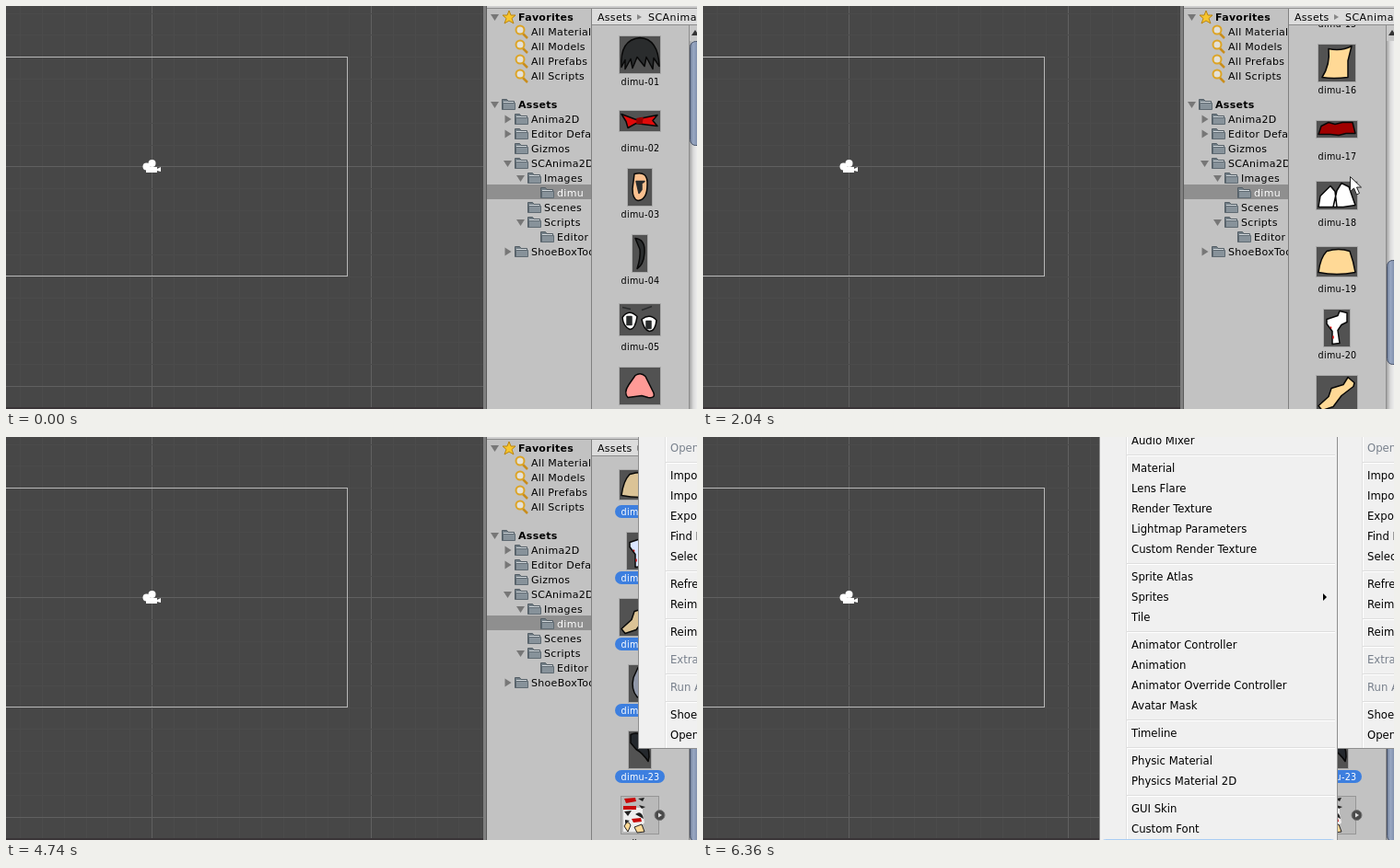
An HTML page with a canvas that plays this animation: 750x438 px, repeating every 8000 ms.

```html
<!DOCTYPE html>
<html lang="en">
<head>
<meta charset="utf-8">
<style>
html, body { margin: 0; width: 100%; height: 100%; overflow: hidden; background: #474747; }
canvas { display: block; }
</style>
</head>
<body>
<canvas id="stage" width="750" height="438"></canvas>
<script>
const ctx = document.getElementById('stage').getContext('2d');
const LOOP = 8000, TICK = 30, ROW = 72;
const SKIN = '#ffd996', WHITE = '#fff', INK = '#2a2c2d', GREY = '#a9a9a9', RED = '#e00a0a';
const FONT = '"DejaVu Sans", sans-serif';

// Each sprite: thumbnail width, height, then colour and path pairs around its centre.
const leg = 'M12-18L19-12 18-8 5 2-4 14-16 18-20 13-9 3-6-6 7-10Z';
const sleeve = 'M-4-16L8-17 10-7 13 3 14 12 2 18-9 15-14 4-8-6Z';
const thigh = 'M-9-15Q5-12 16-18L12-2 12 16Q-4 18-16 16Q-7 2-9-15Z';
const lens = 'M-2-17Q5-16 8-4L8 12Q3 18-3 15Q-10 7-7-6Z';
const sprites = [
  [44, 40, INK, 'M-20 14Q-22-16 0-18Q20-17 21 13L15 4 14 16 7 3 5 13-3 3-8 15-10 5-16 16-16 6Z'],
  [44, 22, RED, 'M-20-7L-4-1 4-3 19-6 14 0 19 6 3 4-4 3-13 8-15 1Z', '#900', 'M-3-2L3-3 2 3-3 3Z'],
  [26, 40, '#fbc08f', 'M-6-14Q9-18 8-2Q8 14-2 15Q-8 14-8 2Z', INK, 'M-4-6L5-6 4-5 2-4 2 3-1 7Z'],
  [16, 40, INK, 'M-5-16Q6-15 5 0Q4 13-3 17Q1 5 0-4Z'],
  [44, 34, WHITE, 'M-19-2Q-12-12-3-3Q-5 11-11 11Q-18 8-19-2ZM2 0Q11-7 18 1Q17 13 10 13Q4 11 2 0Z',
    INK, 'M-14-3H-9V6H-14ZM7 2H12V10H7ZM-19-13L-10-11M2-10L13-14'],
  [44, 40, '#ff9a96', 'M-13 13Q-18 8-12-1L-5-11Q1-15 6-10L15 8Q17 14 9 13L2 11Z'],
  [44, 40, SKIN, 'M-19-2Q-18-14-9-16Q6-19 16-11Q22-3 19 6Q12 18-2 17Q-16 17-18 8Q-15 4-19-2Z'],
  [32, 40, WHITE, sleeve, RED, 'M-10 2L-8 3M-10 8L-8 9M-4 13L-2 14'],
  [44, 34, SKIN, 'M5-15L16-15Q21 2 13 8L0 10-9 9-14 14-19 12-15 5-19 0-6 0 5-3Z'],
  [32, 40, GREY, 'M-9-14Q1-19 9-13L13 2 11 12Q5 19-5 15L-13 5Z'],
  [44, 10, '#222', 'M-20 2L-8 0 4 1 20-2 6 2-6 1Z'],
  [32, 40, WHITE, sleeve],
  [44, 40, SKIN, leg],
  [44, 20, '#a30000', 'M-18-5H18L20 6H-20Z'],
  [24, 40, GREY, lens],
  [40, 40, SKIN, thigh],
  [44, 18, '#a00000', 'M-17-3L-9-7-2-5 6-7 17-7 20 5 10 5 2 7-7 6-20 6Z'],
  [44, 30, WHITE, 'M-20 13L-18 1-7-10-2-4 0 13ZM-4 13L0-5 5-13 13-9 20 11 7 13Z'],
  [44, 32, SKIN, 'M-20 12Q-18-4-11-11Q2-15 14-11Q18 0 20 12Q0 16-20 12Z'],
  [28, 40, WHITE, 'M-11-9L1-13 3-18 11-16 11-6 5-3 1 3 3 17-5 18-5 4-11-4Z', RED, 'M-7-1L-6 1M-4 9L-4 12'],
  [44, 40, SKIN, leg],
  [24, 40, GREY, lens],
  [24, 40, INK, 'M-10-16Q-2-20 3-13Q10-4 10 8L9 13Q3 4-4 0L-10-7Z'],
];

const tree = [ // label, y, indent, arrow, icon
  ['Favorites', 12, 0, 'open', 'star'], ['All Materials', 28, 1, '', 'find'], ['All Models', 44, 1, '', 'find'],
  ['All Prefabs', 60, 1, '', 'find'], ['All Scripts', 76, 1, '', 'find'],
  ['Assets', 107, 0, 'open'], ['Anima2D', 123, 1, 'shut'], ['Editor Default', 139, 1, 'shut'], ['Gizmos', 155, 1],
  ['SCAnima2D', 171, 1, 'open'], ['Images', 187, 2, 'open'], ['dimu', 203, 3], ['Scenes', 219, 2],
  ['Scripts', 235, 2, 'open'], ['Editor', 251, 3], ['ShoeBoxTool', 267, 1, 'shut'],
];

const mainMenu = { x: 686, w: 90, top: -30, bottom: 338, first: 12, groups: [
  ['-Open'], ['Import', 'Import', 'Export', 'Find R', 'Select'], ['Refresh', 'Reimport'], ['Reimport'],
  ['-Extract'], ['-Run API'], ['ShoeBox', 'Open C']] };
const subMenu = { x: 430, w: 258, top: -30, bottom: 470, first: 4, groups: [
  ['Audio Mixer'], ['Material', 'Lens Flare', 'Render Texture', 'Lightmap Parameters', 'Custom Render Texture'],
  ['Sprite Atlas', 'Sprites>', 'Tile'],
  ['Animator Controller', 'Animation', 'Animator Override Controller', 'Avatar Mask'],
  ['Timeline'], ['Physic Material', 'Physics Material 2D'], ['GUI Skin', 'Custom Font', 'Shader']] };

const cursorKeys = [[330, 753, 98], [870, 689, 52], [1260, 689, 52], [1470, 686, 186], [1590, 685, 187],
  [2040, 702, 185], [2130, 727, 208], [2280, 727, 208], [2790, 694, 338], [3300, 694, 338], [3600, 707, 320],
  [3720, 707, 320], [3900, 688, 338], [4290, 688, 338], [4740, 712, -26], [5790, 600, -26], [6360, 545, 440]];
const scrollKeys = [[1440, 0], [1590, 360], [2040, 1071], [2130, 1297]];

const smooth = k => k * k * (3 - 2 * k);
function at(keys, t, ease = k => k) {
  const next = keys.findIndex(key => key[0] > t);
  if (next === 0) return keys[0].slice(1);
  if (next < 0) return keys[keys.length - 1].slice(1);
  const a = keys[next - 1], b = keys[next], k = ease((t - a[0]) / (b[0] - a[0]));
  return a.slice(1).map((v, i) => v + (b[i + 1] - v) * k);
}

function rect(x, y, w, h, color) {
  ctx.fillStyle = color;
  ctx.fillRect(x, y, w, h);
}
function text(str, x, y, size = 11, color = '#000', { bold = false, align = 'left', gap = 0 } = {}) {
  ctx.font = `${bold ? 'bold ' : ''}${size}px ${FONT}`;
  ctx.letterSpacing = gap + 'px';
  ctx.textAlign = align;
  ctx.fillStyle = color;
  ctx.fillText(str, x, y + 4);
}
function shape(d, x, y, fill, stroke, width = 1) {
  const path = new Path2D(d);
  ctx.save();
  ctx.translate(x, y);
  if (fill) { ctx.fillStyle = fill; ctx.fill(path); }
  if (stroke) { ctx.strokeStyle = stroke; ctx.lineWidth = width; ctx.lineJoin = 'round'; ctx.stroke(path); }
  ctx.restore();
}
function circle(x, y, r, fill, stroke, width = 1) {
  ctx.beginPath();
  ctx.arc(x, y, r, 0, 7);
  if (fill) { ctx.fillStyle = fill; ctx.fill(); }
  if (stroke) { ctx.strokeStyle = stroke; ctx.lineWidth = width; ctx.stroke(); }
}
function pill(x, y, w, h, r, fill, stroke) {
  ctx.beginPath();
  ctx.roundRect(x, y, w, h, r);
  ctx.fillStyle = fill;
  ctx.fill();
  if (stroke) { ctx.strokeStyle = stroke; ctx.lineWidth = 1; ctx.stroke(); }
}
function clipped(x, y, w, h, draw) {
  ctx.save();
  ctx.beginPath();
  ctx.rect(x, y, w, h);
  ctx.clip();
  draw();
  ctx.restore();
}

function drawScene() {
  rect(0, 0, 518, 438, '#474747');
  const step = 23.82;
  for (let i = -6; i <= 15; i++) rect(Math.round(158 + i * step), 0, 1, 438, i % 10 ? '#4b4b4b' : '#606060');
  for (let i = -7; i <= 11; i++) rect(0, Math.round(174.4 + i * step), 518, 1, i % 10 ? '#4b4b4b' : '#606060');
  ctx.strokeStyle = '#b8b8b8';
  ctx.lineWidth = 1;
  ctx.strokeRect(-5.5, 55.5, 376, 238);
  circle(152.5, 174.5, 4, WHITE);
  circle(158.5, 171, 4, WHITE);
  shape('M-6 1H6V3L10 1V6L6 5V7H-6Z', 158, 174, WHITE);
  rect(0, 436, 518, 2, '#393437');
  rect(518, 0, 3, 438, '#7f7f7f');
  rect(521, 0, 1, 438, '#5c5c5c');
}

function drawIcon(kind, x, y) {
  if (kind === 'star') {
    shape('M0-7L2-2 7-2 3 1.500 5 7 0 4-5 7-3 1.500-7-2-2-2Z', x + 8, y, '#f8c62c', '#b98512');
  } else if (kind === 'find') {
    shape('M3 3L8 8', x + 6, y - 1, null, '#c98d1c', 2.5);
    circle(x + 6, y - 2, 4.5, '#e4e1d8', '#dca426', 2);
  } else {
    shape('M.5-5.500H5.500L7-3.500H13.500V5.500H.5Z', x, y, '#737f87', '#525d65');
    shape('M1.500-1.500H14.500V5.500H1.500Z', x, y, '#87929a', '#5f6a72');
    rect(x + 2, y - 3, 11, 1, '#d3d9dd');
  }
}

function drawTree() {
  rect(522, 0, 228, 438, '#c2c2c2');
  clipped(522, 0, 113, 438, () => {
    rect(522, 194, 113, 16, '#8f8f8f');
    for (const [label, y, indent, arrow, icon] of tree) {
      const x = 538 + indent * 14;
      if (arrow) shape(arrow === 'open' ? 'M-4.500-3H4.500L0 4Z' : 'M-3-4.500L4 0-3 4.500Z', x - 7.5, y, '#777');
      drawIcon(icon, x, y);
      text(label, x + 18, y, 11, label === 'dimu' ? WHITE : '#000', { bold: !indent, gap: .3 });
    }
  });
  rect(635, 0, 1, 438, '#808080');
}

function drawThumb(i, x, y, selected) {
  const [w, h, ...parts] = sprites[i];
  const mid = y + .5;
  rect(x - w / 2 - 1, y - h / 2, w + 2, h + 2, '#aaa');
  rect(x - w / 2, y - h / 2 + 1, w, h, '#525252');
  for (let p = 0; p < parts.length; p += 2) {
    shape(parts[p + 1], x, mid, parts[p], p ? parts[p] : '#080808', 1.5);
  }
  if (selected) {
    ctx.globalCompositeOperation = 'multiply';
    shape(parts[1], x, mid, '#dbe6ff');
    ctx.globalCompositeOperation = 'source-over';
    pill(x - 27, y + 23, 54, 14, 7, '#3d7fdf');
  }
  const name = 'dimu-' + String(i + 1).padStart(2, '0');
  text(name, x + .5, y + 30, 9.6, selected ? WHITE : '#000', { align: 'center', gap: .3 });
}

function drawSheet(x, y) {
  rect(x - 21, y - 21, 42, 42, '#969696');
  rect(x - 20, y - 20, 40, 40, '#b9b9b9');
  shape('M-18-8H3V-2L5 8-4 18H-18Z', x, y, '#eee');
  shape('M-17-18L-5-19-4-15-15-13ZM-18-10H-4V-6H-18ZM-9 4L1 3 2 7-7 8Z', x, y, '#c80909');
  shape('M-17 12Q-13 4-10 11L-13 18ZM-6 13L2 10 5 18-3 19Z', x, y, SKIN, '#222');
  shape('M-2-18L5-19 3-15ZM-17-4L-9-5-13 1ZM-5-1Q2-6 4 4ZM-1-11L6-9 2-7ZM-16 5L-11 6-16 9Z', x, y, '#222');
  circle(x + 21.5, y, 5.5, '#4a4a4a', '#777');
  shape('M-1.500-2.500L2.500 0-1.500 2.500Z', x + 21.5, y, '#ddd');
}

function drawAssets(t, scroll) {
  const isSelected = i => t >= 3000 ? i < 23 : t >= 1020 && i === 0;
  clipped(636, 21, 106, 417, () => {
    for (let i = 0; i <= sprites.length; i++) {
      const y = 52 + i * ROW - Math.round(scroll);
      if (y < -40 || y > 470) continue;
      if (i < sprites.length) drawThumb(i, 688, y, isSelected(i));
      else {
        drawSheet(688, y);
        text('dimu', 688, y + 30, 9.6, '#000', { align: 'center' });
      }
    }
  });
  rect(522, 0, 228, 2, '#cecece');
  rect(522, 2, 228, 1, '#8e8e8e');
  rect(636, 3, 114, 17, '#dcdcdc');
  rect(636, 20, 114, 1, '#8c8c8c');
  text('Assets', 642, 12, 11, '#000', { gap: .3 });
  shape('M-2-3L3 0-2 3Z', 687, 12, '#888');
  text('SCAnima2D', 697, 12, 11, '#000', { gap: .45 });

  const track = ctx.createLinearGradient(742, 0, 750, 0);
  track.addColorStop(0, '#a4a4a4');
  track.addColorStop(.5, '#dadada');
  track.addColorStop(1, '#ececec');
  rect(741, 21, 1, 417, '#8d8d8d');
  rect(742, 38, 8, 400, track);
  rect(742, 21, 8, 17, '#c8c8c8');
  shape('M-4 3H4L0-3Z', 748, 29, '#333');
  const bar = ctx.createLinearGradient(742, 0, 750, 0);
  bar.addColorStop(0, '#68768f');
  bar.addColorStop(.5, '#9aa9c4');
  bar.addColorStop(1, '#8190ac');
  pill(742.5, 38.5 + scroll * .2222, 15, 113, 6, bar, '#465065');
}

function drawMenu({ x, w, top, bottom, first, groups }, px, py) {
  rect(x, top, w + 1, bottom - top + 1, '#8f8f8f');
  rect(x + 1, top, w - 1, bottom - top, '#f0f0f0');
  rect(x + 29, top, 1, bottom - top, '#e0e0e0');
  rect(x + 30, top, 1, bottom - top, '#fff');
  let y = first;
  for (const group of groups) {
    for (const item of group) {
      const hover = px > x && px < x + w && py >= y - 11 && py < y + 11;
      if (hover) pill(x + 3.5, y - 10.5, w - 6, 21, 3, '#dce9f7', '#a9cdf3');
      text(item.replace(/[->]/g, ''), x + 35, y, 11.65, item[0] === '-' ? '#78808c' : '#000');
      if (item.endsWith('>')) shape('M-2-4L2 0-2 4Z', x + 245, y, '#000');
      y += 22;
    }
    if (y < bottom) {
      rect(x + 30, y - 7, w - 32, 1, '#dedede');
      rect(x + 30, y - 6, w - 32, 1, '#fff');
    }
    y += 8;
  }
}

function draw(t) {
  const [px, py] = at(cursorKeys, t, smooth);
  const [scroll] = at(scrollKeys, t);
  drawScene();
  drawTree();
  drawAssets(t, scroll);
  if (t >= 4320) drawMenu(mainMenu, px, py);
  if (t >= 5460) drawMenu(subMenu, px, py);
  if (t >= 1020 && t < 1140 || t >= 3000 && t < 3090) circle(px - 4.5, py - 3.5, 11, null, '#ff0', 3);
  shape('M0 0V16L4 12.500 7 19.500 10 18 7 11.500H12Z', Math.round(px) + .5, Math.round(py) + .5, WHITE, '#222');
}

function frame(now) {
  draw(Math.floor((now % LOOP) / TICK) * TICK);
  requestAnimationFrame(frame);
}
requestAnimationFrame(frame);
</script>
</body>
</html>
```
